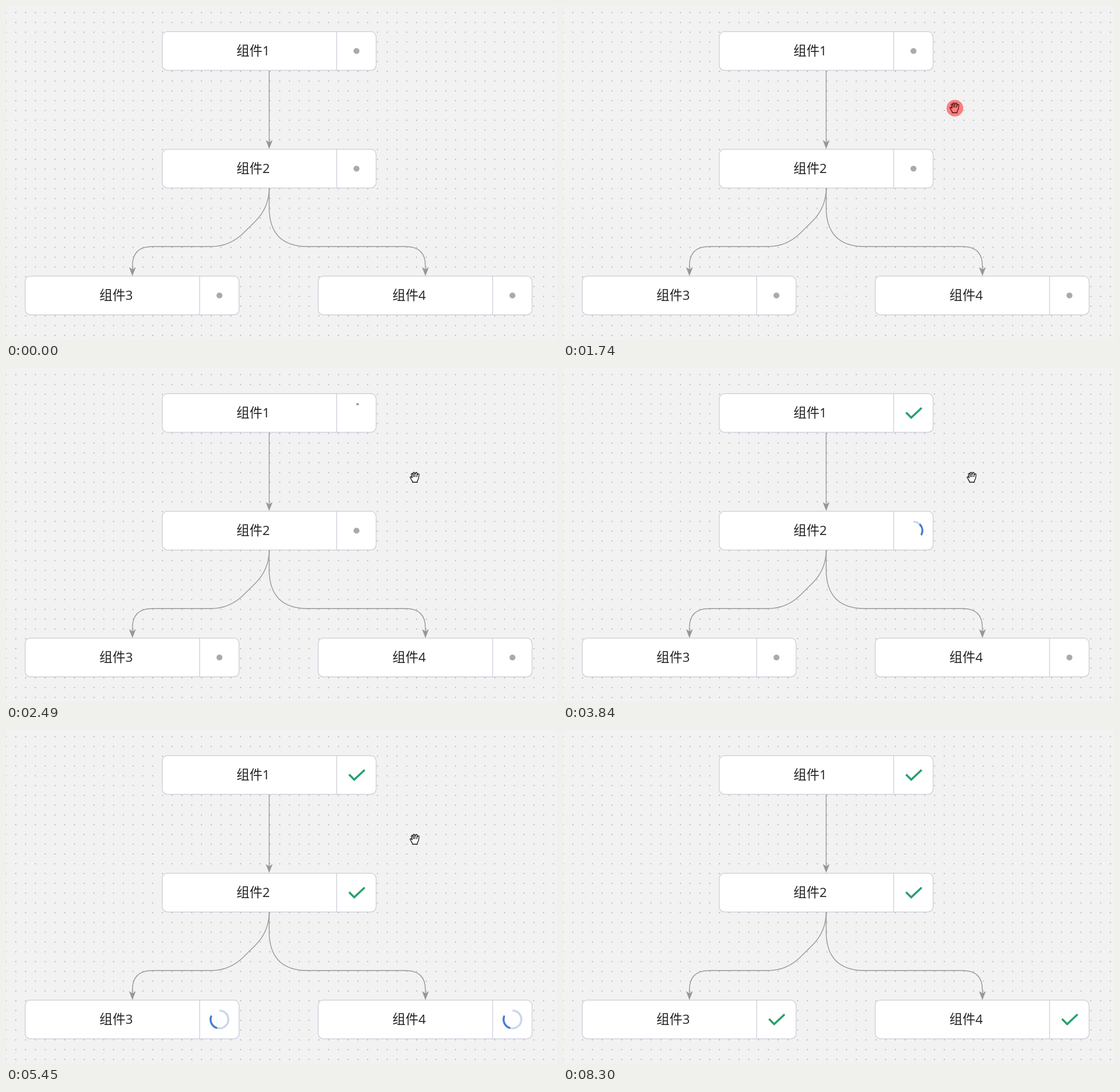
An HTML page with a canvas for the animation above (8700 ms loop, 961 by 582 pixels).

```html
<!DOCTYPE html>
<html lang="zh-CN">
<head>
<meta charset="utf-8">
<title>组件流程</title>
<style>
html, body { margin: 0; width: 100%; height: 100%; overflow: hidden; background: #f2f2f2; }
canvas { display: block; width: 961px; height: 582px; }
</style>
</head>
<body>
<canvas id="stage"></canvas>
<script>
const W = 961, H = 582, LOOP = 8700, TICK = 70, CELL = 17.045;
const canvas = document.getElementById('stage');
const dpr = window.devicePixelRatio || 1;
canvas.width = W * dpr;
canvas.height = H * dpr;
const ctx = canvas.getContext('2d');
ctx.scale(dpr, dpr);

const nodes = [
  { name: '组件1', x: 272, y: 44, start: 2490, done: 3640, hold: 200 },
  { name: '组件2', x: 272, y: 249, start: 3640, done: 4540, hold: 0 },
  { name: '组件3', x: 33, y: 470, start: 4540, done: 5680, hold: 0 },
  { name: '组件4', x: 544, y: 470, start: 4540, done: 6820, hold: 0 }
];

const edges = [
  new Path2D('M459 112V238'),
  new Path2D('M459 317Q459 351 435 375L414.5 395.2Q390.5 419.2 356.5 419.2H254.5Q220.5 419.2 220.5 453V460'),
  new Path2D('M459 317V351Q459 385 476 402.2Q493 419.2 527 419.2H697.5Q731.5 419.2 731.5 453V460')
];
const arrows = [[459, 249], [220.5, 470.5], [731.5, 470.5]];
const arrowHead = new Path2D('M0 0L-6 -15.5L0 -11.5L6 -15.5Z');
const tick = new Path2D('M-13 -.8L-4 8.2L14.2 -9');
const hand = new Path2D('M-4 9Q-4 7 -6 4.5L-8 1Q-8.6 -.8 -6.6 -.6L-4.6 1.2L-6 -5Q-5.8 -7 -4 -6.2L-2.8 -3L-2.8 -7.4Q-1.6 -9.2 -.4 -7.6L.2 -4L1.6 -7.6Q3.2 -8.8 4 -7L3.8 -3.2L5.4 -5.4Q7.4 -6.2 7.4 -4L6.6 2Q6.4 4 4.6 6L4.4 9Z');
const creases = new Path2D('M-2.8 -3L-2 0M.2 -4V0M3.8 -3.2L3.2 .2');

// Pointer stops: time, x, y
const stops = [
  [1180, 808, 472], [1390, 640, 300], [1460, 607, 235], [1600, 683, 177], [1740, 683, 177],
  [1810, 692, 188], [1940, 692, 188], [2010, 700, 200], [2150, 710, 216], [2280, 710, 216],
  [2350, 713, 203], [2420, 713, 190], [7810, 713, 190], [8230, 950, 528]
];
const GONE = 8300;

function disc(x, y, r, color) {
  ctx.fillStyle = color;
  ctx.beginPath();
  ctx.arc(x, y, r, 0, Math.PI * 2);
  ctx.fill();
}

function at(x, y, draw) {
  ctx.save();
  ctx.translate(x, y);
  draw();
  ctx.restore();
}

function arc(from, to, color) {
  const rad = Math.PI / 180;
  ctx.strokeStyle = color;
  ctx.beginPath();
  ctx.arc(0, 0, 15.5, (from - 90) * rad, (to - 90) * rad);
  ctx.stroke();
}

function background() {
  ctx.fillStyle = '#f2f2f2';
  ctx.fillRect(0, 0, W, H);
  ctx.fillStyle = '#aaa';
  for (let y = 10.7; y < H; y += CELL)
    for (let x = -0.7; x < W; x += CELL) ctx.fillRect(x, y, 1.7, 1.7);
}

function links() {
  ctx.strokeStyle = ctx.fillStyle = '#979797';
  ctx.lineWidth = 1.4;
  edges.forEach(e => ctx.stroke(e));
  arrows.forEach(([x, y]) => at(x, y, () => ctx.fill(arrowHead)));
}

function spinner(age) {
  const e = Math.floor((age + 10) / TICK) * TICK;
  const head = e < 210 ? 14 + e * 0.48 : 115 + (e - 210) * 0.25;
  const tail = Math.max(head * 0.42, head - 90);
  ctx.lineWidth = 3.4;
  if (head < 20) {
    arc(0, head, '#8c8c8c');
    return;
  }
  arc(0, Math.min(head, 360), '#c9d6ea');
  ctx.lineCap = 'round';
  arc(tail, head, '#437fd1');
}

function status(node, t) {
  if (t < node.start) {
    disc(0, 0, 5.2, '#aaa');
  } else if (t < node.done) {
    const age = t - node.start;
    spinner(age < node.hold ? 0 : age);
  } else {
    ctx.strokeStyle = '#26a06c';
    ctx.lineWidth = 3.5;
    ctx.stroke(tick);
  }
}

function drawNode(node, t) {
  const { x, y } = node;
  ctx.fillStyle = '#fff';
  ctx.strokeStyle = '#c9cad8';
  ctx.lineWidth = 1.2;
  ctx.beginPath();
  ctx.roundRect(x + 0.5, y + 0.7, 373, 67.4, 9);
  ctx.fill();
  ctx.stroke();
  ctx.beginPath();
  ctx.moveTo(x + 304.7, y + 1);
  ctx.lineTo(x + 304.7, y + 68);
  ctx.stroke();
  ctx.fillStyle = '#222';
  ctx.font = '22.7px "Open Sans", "Noto Sans CJK SC", "Noto Sans CJK", sans-serif';
  ctx.textBaseline = 'alphabetic';
  ctx.fillText(node.name, x + 130, y + 42);
  at(x + 339.3, y + 34.4, () => status(node, t));
}

function pointerAt(t) {
  const i = stops.findIndex(s => s[0] > t);
  if (i < 0) return stops[stops.length - 1].slice(1);
  const [t0, x0, y0] = stops[i - 1], [t1, x1, y1] = stops[i];
  const k = (t - t0) / (t1 - t0);
  return [x0 + (x1 - x0) * k, y0 + (y1 - y0) * k];
}

function pointer(t) {
  if (t < stops[0][0] || t >= GONE) return;
  const step = Math.floor((t - 1180) / TICK) * TICK + 1180;
  const pressed = t >= 1740 && t < 1810;
  const [x, y] = pointerAt(step);
  if (pressed) disc(683.5, 178, 14.6, '#fb8080');
  at(x, y, () => {
    ctx.fillStyle = pressed ? '#fb8080' : '#fff';
    ctx.strokeStyle = pressed ? '#48100f' : '#111';
    ctx.lineWidth = 1.3;
    ctx.lineJoin = 'round';
    ctx.fill(hand);
    ctx.stroke(hand);
    ctx.stroke(creases);
  });
}

function render(t) {
  background();
  links();
  nodes.forEach(n => drawNode(n, t));
  pointer(t);
}

let origin = null;
function loop(now) {
  if (origin === null) origin = now;
  render((now - origin) % LOOP);
  requestAnimationFrame(loop);
}
render(0);
requestAnimationFrame(loop);
</script>
</body>
</html>
```
